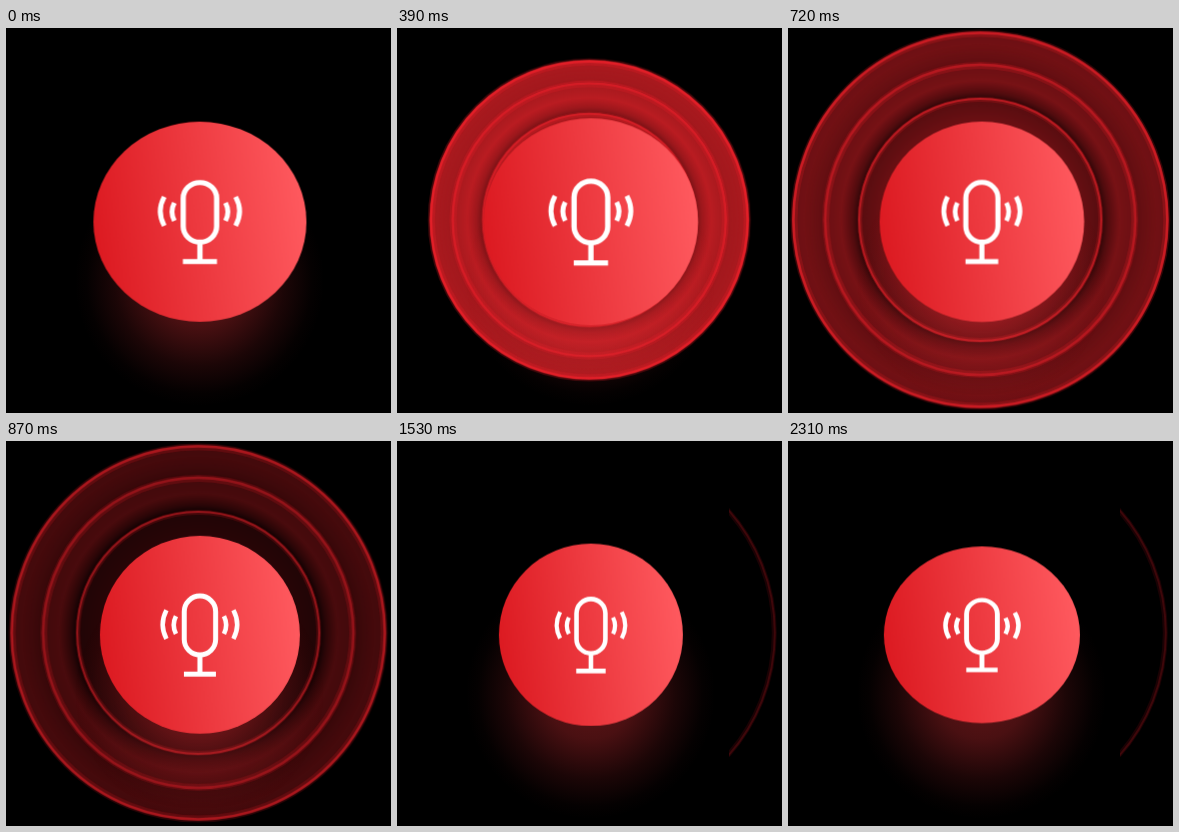
Recreate the animation shown at these times as an HTML page. Size 385 by 385 pixels, loop 2340 ms.

```html
<!DOCTYPE html>
<html lang="en">
<head>
<meta charset="utf-8">
<title>Voice button</title>
<style>
  html, body { margin: 0; width: 100%; height: 100%; overflow: hidden; background: #000; }
  svg { display: block; width: 100vw; height: 100vh; }

  .button, .ring, .fill, .line, .halo, .trace {
    animation: 2340ms linear infinite;
  }
  .button { animation-name: squash; }
  .ring.outer { animation-name: grow-outer; }
  .ring.middle { animation-name: grow-middle; }
  .ring.inner { animation-name: grow-inner; }
  .fill { animation-name: dim; }
  .inner .fill { animation-name: dim-inner; }
  .line { animation-name: fade-line; }
  .halo { animation-name: shade; }
  .trace { animation-name: trace; animation-timing-function: step-end; }

  .line circle { fill: none; stroke: #e21f28; stroke-width: 2.5; vector-effect: non-scaling-stroke; }
  .line .soft { stroke-width: 7; stroke-opacity: .3; }
  .inner .line circle { stroke: #d21e26; stroke-width: 2; }
  .inner .line .soft { stroke-width: 5; }
  .icon { fill: none; stroke: #fff; stroke-width: 5; }
  .waves { stroke-width: 4.6; }

  @keyframes squash {
    0% { transform: scale(1.065, 1); }
    5.13% { transform: scale(1.083, 1.02); }
    10.26% { transform: scale(1.086, 1.034); }
    16.67% { transform: scale(1.072, 1.035); }
    21.79% { transform: scale(1.055, 1.02); }
    37.18% { transform: scale(1, .99); }
    51.28% { transform: scale(.957, .948); }
    65.38% { transform: scale(.92, .912); }
    73.08% { transform: scale(.912, .897); }
    80.77% { transform: scale(.918, .888); }
    88.46% { transform: scale(.938, .885); }
    93.59% { transform: scale(.96, .884); }
    98.72% { transform: scale(.98, .884); }
    100% { transform: scale(.985, .884); }
  }
  @keyframes grow-outer {
    0% { transform: scale(.51); }
    6.41% { transform: scale(.59); }
    11.54% { transform: scale(.715); }
    16.67% { transform: scale(.848); }
    21.79% { transform: scale(.968); }
    25.64% { transform: scale(1.004); }
    37.18% { transform: scale(1); }
    48%, 100% { transform: scale(.99); }
  }
  @keyframes grow-middle {
    0% { transform: scale(.61); }
    6.41% { transform: scale(.68); }
    11.54% { transform: scale(.78); }
    16.67% { transform: scale(.88); }
    21.79% { transform: scale(.996); }
    25.64%, 100% { transform: scale(1); }
  }
  @keyframes grow-inner {
    0% { transform: scale(.76); }
    6.41% { transform: scale(.77); }
    11.54% { transform: scale(.81); }
    16.67% { transform: scale(.876); }
    21.79% { transform: scale(.993); }
    25.64%, 100% { transform: scale(1); }
  }
  @keyframes dim {
    0%, 21.79% { opacity: 1; }
    37.18% { opacity: .4; }
    48%, 100% { opacity: 0; }
  }
  @keyframes dim-inner {
    0%, 21.79% { opacity: 1; }
    37.18% { opacity: .2; }
    48%, 100% { opacity: 0; }
  }
  @keyframes fade-line {
    0%, 21.79% { opacity: 1; }
    37.18% { opacity: .66; }
    47.44% { opacity: .18; }
    48%, 100% { opacity: 0; }
  }
  @keyframes shade {
    0%, 21.79% { opacity: .42; }
    37.18% { opacity: .85; }
    48%, 100% { opacity: 0; }
  }
  @keyframes trace {
    0% { opacity: 0; }
    47.9%, 100% { opacity: 1; }
  }
</style>
</head>
<body>
<svg viewBox="0 0 385 385">
  <defs>
    <radialGradient id="dish">
      <stop offset=".7" stop-color="#c91f25"/>
      <stop offset=".82" stop-color="#c71e24"/>
      <stop offset=".93" stop-color="#b01b20"/>
      <stop offset="1" stop-color="#a6191e"/>
    </radialGradient>
    <radialGradient id="shadow">
      <stop offset=".87" stop-color="#000"/>
      <stop offset=".92" stop-color="#000" stop-opacity=".55"/>
      <stop offset="1" stop-color="#000" stop-opacity="0"/>
    </radialGradient>
    <radialGradient id="glow">
      <stop offset="0" stop-color="#e63238" stop-opacity=".42"/>
      <stop offset=".36" stop-color="#e63238" stop-opacity=".32"/>
      <stop offset=".68" stop-color="#e63238" stop-opacity=".12"/>
      <stop offset=".9" stop-color="#e63238" stop-opacity=".02"/>
      <stop offset="1" stop-color="#e63238" stop-opacity="0"/>
    </radialGradient>
    <linearGradient id="face" x1="0" y1=".57" x2="1" y2=".43">
      <stop offset="0" stop-color="#dc1a21"/>
      <stop offset="1" stop-color="#ff5a5f"/>
    </linearGradient>
    <clipPath id="edge"><rect x="332" y="66" width="53" height="250"/></clipPath>
  </defs>

  <rect width="385" height="385"/>

  <g transform="translate(192.3 191.8)">
    <g class="ring outer">
      <circle class="fill" r="188" fill="url(#dish)"/>
      <g class="line"><circle class="soft" r="186"/><circle r="186.5"/></g>
    </g>
    <g class="ring middle">
      <g opacity=".45"><circle class="halo" r="176" fill="url(#shadow)"/></g>
      <circle r="156"/>
      <circle class="fill" r="156.5" fill="url(#dish)"/>
      <g class="line" ><circle class="soft" r="154.5"/><circle r="155" stroke-opacity=".7"/></g>
    </g>
    <g class="ring inner">
      <circle class="halo" r="139" fill="url(#shadow)"/>
      <circle r="121.5"/>
      <circle class="fill" r="122" fill="url(#dish)"/>
      <g class="line"><circle class="soft" r="120.5"/><circle r="121"/></g>
    </g>
  </g>

  <g class="trace" clip-path="url(#edge)" fill="none" stroke="#4a080c">
    <circle cx="192.3" cy="191.8" r="185" stroke-width="5" stroke-opacity=".35"/>
    <circle cx="192.3" cy="191.8" r="185.5" stroke-width="2" stroke-opacity=".75"/>
  </g>

  <circle cx="193.5" cy="253" r="125" fill="url(#glow)"/>

  <g transform="translate(193.9 193.8)">
    <g class="button">
      <circle r="100" fill="url(#face)"/>
      <g class="icon">
        <rect x="-15.7" y="-39.3" width="31.4" height="59.6" rx="15.7"/>
        <path d="M0 21V40M-16 39.7H16"/>
        <path class="waves" d="M-33.5 -25Q-41 -10.5 -33.5 4M-24 -19Q-28.5 -10 -24 -1M33.5 -25Q41 -10.5 33.5 4M24 -19Q28.5 -10 24 -1"/>
      </g>
    </g>
  </g>
</svg>
</body>
</html>
```
